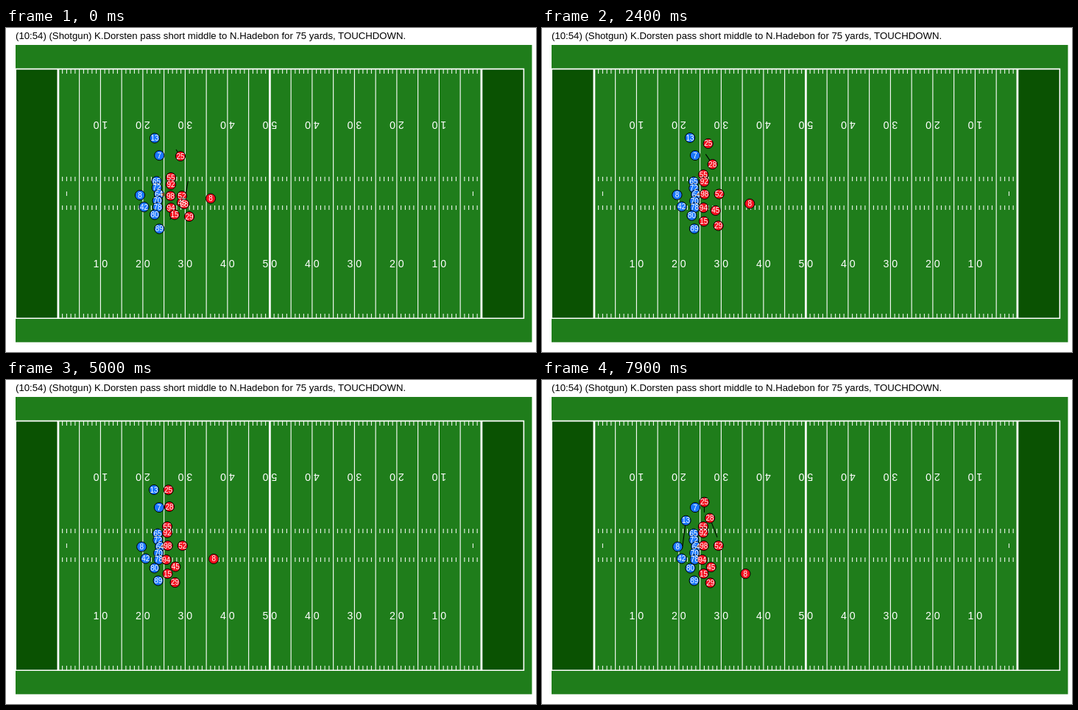
Write an HTML page that moves like this. It is 720 px wide and 440 px high and loops after 8000 ms.

```html
<!DOCTYPE html>
<html lang="en">
<head>
<meta charset="utf-8">
<title>Play tracking</title>
<style>
  html, body { margin: 0; width: 100%; height: 100%; overflow: hidden; background: #fff; }
  svg { display: block; width: 720px; height: 440px; font-family: "Liberation Sans", Arial, sans-serif; }
  .title { font-size: 13.2px; }
  .yards { font-size: 14.2px; fill: #fff; text-anchor: middle; }
  .jersey { font-size: 10px; fill: #fff; text-anchor: middle; }
  .chalk { stroke: #fff; fill: none; }
  .dot { stroke: #000; stroke-width: 1; }
  .speed { stroke: #000; stroke-width: 1.1; }
  .blue { fill: #1a78ff; }
  .red { fill: #f50f1e; }
</style>
</head>
<body>
<svg viewBox="0 0 720 440">
  <text class="title" x="13" y="15">(10:54) (Shotgun) K.Dorsten pass short middle to N.Hadebon for 75 yards, TOUCHDOWN.</text>
  <rect x="13" y="23" width="701.5" height="403.7" fill="#1f7d1b"/>
  <g id="field"></g>
  <g id="speeds"></g>
  <g id="blue"></g>
  <ellipse cx="213" cy="226" rx="2.6" ry="2.2" fill="#7a4522"/>
  <g id="red"></g>
  <g id="jerseys"></g>
</svg>
<script>
const LOOP = 8000, STEP = 100;
const TOP = 55.6, BOTTOM = 394.3;
const RAMP = 1.2; // seconds a runner needs to reach full speed
const yardX = yard => 13.4 + 5.75 * yard;

function make(parent, tag, attrs, text) {
  const el = document.createElementNS('http://www.w3.org/2000/svg', tag);
  for (const key in attrs) el.setAttribute(key, attrs[key]);
  if (text !== undefined) el.textContent = text;
  return document.getElementById(parent).appendChild(el);
}

function drawField() {
  const chalk = (d, width) => make('field', 'path', { class: 'chalk', d, 'stroke-width': width });
  const upright = (yard, y1, y2) => `M${yardX(yard)} ${y1}V${y2}`;

  for (const yard of [0, 110]) {
    make('field', 'rect', { x: yardX(yard), y: TOP, width: 57.5, height: BOTTOM - TOP, fill: '#0a5202' });
  }

  let thin = '', thick = '', hashes = '';
  for (let yard = 10; yard <= 110; yard++) {
    if (yard % 50 === 10) thick += upright(yard, TOP, BOTTOM);
    else if (yard % 5 === 0) thin += upright(yard, TOP, BOTTOM);
    else for (const y of [56, 202, 241, 388]) hashes += upright(yard, y, y + 6);
  }
  for (const yard of [12, 108]) hashes += upright(yard, 222, 228);
  chalk(thin, 1.1);
  chalk(hashes, 1);
  chalk(thick, 2.8);
  chalk(`M13 ${TOP}H${yardX(120)}V${BOTTOM}H13`, 1.6);
  chalk(upright(0, TOP, BOTTOM), 1.2);

  for (let yard = 20; yard <= 100; yard += 10) {
    const x = yardX(yard), label = `${Math.min(yard - 10, 110 - yard) / 10} 0`;
    make('field', 'text', { class: 'yards', x, y: 324.6 }, label);
    make('field', 'text', { class: 'yards', x, y: 126.9, transform: `rotate(180 ${x} 126.9)` }, label);
  }
}

const players = [];

// A player slows down into a spot, bending sideways on the way,
// and may then run off from a given second at a velocity in px/s.
function player(team, number, [x0, y0], [x1, y1], settle, { bend = 0, start = 8, run = [0, 0] } = {}) {
  const position = t => {
    const p = 1 - Math.max(0, 1 - t / settle) ** 2;
    const u = Math.max(0, t - start);
    const stride = u < RAMP ? u * u / (2 * RAMP) : u - RAMP / 2;
    return [
      x0 + (x1 - x0) * p + bend * Math.sin(Math.PI * p) + run[0] * stride,
      y0 + (y1 - y0) * p + run[1] * stride
    ];
  };
  players.push({
    position,
    line: make('speeds', 'line', { class: 'speed' }),
    dot: make(team, 'circle', { class: 'dot ' + team, r: 6.6 }),
    text: make('jerseys', 'text', { class: 'jersey' }, number)
  });
}

function setAll(el, attrs) {
  for (const key in attrs) el.setAttribute(key, attrs[key].toFixed(2));
}

// Each line shows where a player would be one second on.
function draw(t) {
  const dt = 0.02;
  for (const { position, line, dot, text } of players) {
    const [x, y] = position(t), [nextX, nextY] = position(t + dt);
    setAll(line, { x1: x, y1: y, x2: x + (nextX - x) / dt, y2: y + (nextY - y) / dt });
    setAll(dot, { cx: x, cy: y });
    setAll(text, { x, y: y + 3.5 });
  }
}

drawField();

[65, 72, 64, 70, 78].forEach((number, i) => {
  const x = 206 + 0.4 * i + (number === 64 ? 2.5 : 0), y = 208.6 + 8.8 * i;
  player('blue', number, [x - 1.5, y - 0.5], [x, y], 2.4);
});
player('blue', 13, [202, 149.5], [201, 149], 3, { start: 6.2, run: [-5, 38] });
player('blue', 7, [208.3, 173], [208, 173], 3);
player('blue', 8, [182, 227], [184.3, 226.4], 6);
player('blue', 42, [187.5, 243], [189.7, 242.5], 1.5);
player('blue', 80, [202, 253.5], [201.5, 255.5], 6, { bend: 2 });
player('blue', 89, [208.3, 272.7], [206.7, 272.5], 4);

player('red', 55, [224, 203], [219, 199], 3);
player('red', 92, [224, 212.5], [219, 207.5], 5);
player('red', 98, [223.5, 228], [219.7, 225], 5);
player('red', 94, [224, 244.3], [217.7, 244], 5);
player('red', 15, [229, 253.5], [219.5, 263], 3);
player('red', 52, [239, 228], [239.8, 225], 4, { bend: 2 });
player('red', 45, [239, 237], [229.7, 254], 6, { bend: 3 });
player('red', 25, [237, 174], [220.5, 149], 5.5, { start: 6.1, run: [0, 14] });
player('red', 28, [242, 239], [222, 172], 4.3, { bend: 10, start: 6.7, run: [10, 26] });
player('red', 29, [249, 256], [228.7, 275.5], 6, { bend: 4 });
player('red', 8, [278, 231.5], [283, 240], 4, { start: 4, run: [-2, 7] });

function tick() {
  draw(Math.floor(performance.now() % LOOP / STEP) * STEP / 1000);
  requestAnimationFrame(tick);
}
tick();
</script>
</body>
</html>
```
